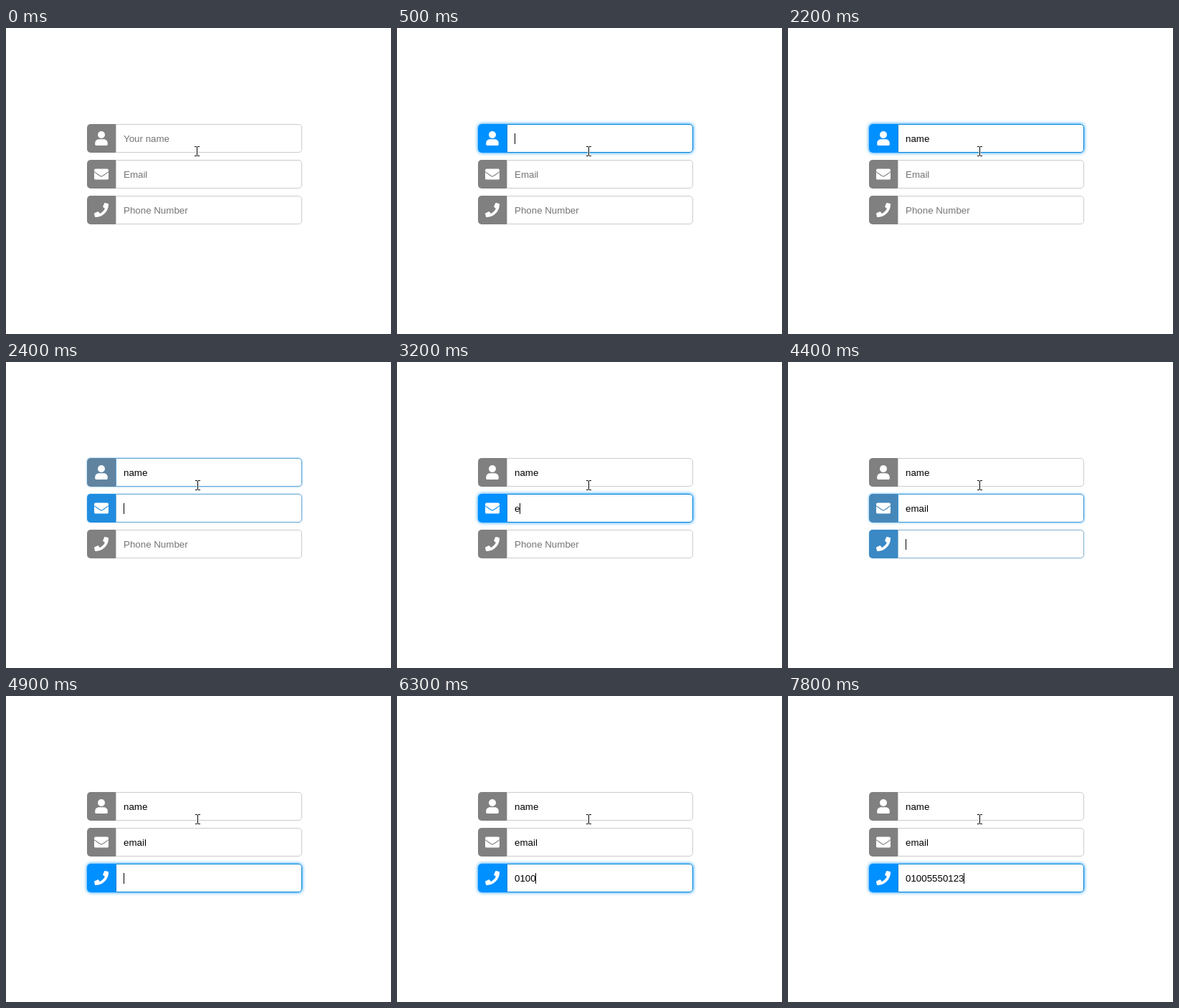
An HTML page for the animation above (8000 ms loop, 537x427 px).

```html
<!DOCTYPE html>
<html lang="en">
<head>
<meta charset="utf-8">
<title>Form focus</title>
<style>
  html, body { margin: 0; width: 100%; height: 100%; overflow: hidden; background: #fff; }
  .field {
    position: absolute; left: 113px; width: 300px; height: 40px; border-radius: 5px;
    font: 13.3333px/15px "Liberation Sans", Arial, sans-serif;
  }
  .icon {
    position: absolute; width: 40px; height: 40px;
    border-radius: 5px 0 0 5px; background: currentColor;
  }
  .icon svg { position: absolute; left: 10px; top: 9.5px; width: 20px; height: 20px; fill: #fff; overflow: visible; }
  .input {
    position: absolute; left: 40px; width: 260px; height: 40px; box-sizing: border-box;
    border: 1px solid; border-radius: 0 5px 5px 0; background: #fff;
  }
  .text { position: absolute; left: 10px; top: 12px; white-space: pre; }
  .caret { position: absolute; top: 12px; width: 1px; height: 15px; background: #000; }
  #pointer { position: absolute; top: 164px; width: 9px; height: 16px; fill: none; }
</style>
</head>
<body>
<svg id="pointer" viewBox="0 0 9 16">
  <path id="beam" d="M1 1.5H4M5 1.5H8M4.5 2V14M1 14.5H4M5 14.5H8" stroke="#fff" stroke-width="2.6"/>
  <path d="M1 1.5H4M5 1.5H8M4.5 2V14M1 14.5H4M5 14.5H8" stroke="#000"/>
</svg>
<script>
const LOOP = 8000, STEP = 100, FADE = 300, CARET_ON = 600;
const GREY = [128, 128, 128], BLUE = [0, 144, 255];
const EDGE = [204, 204, 204], EDGE_ON = [0, 130, 214];

const user = `<circle cx="256" cy="128" r="128"/>
  <path d="M32 464v-42c0-74 60-134 134-134h180c74 0 134 60 134 134v42q0 48-48 48H80q-48 0-48-48z"/>`;
const envelope = `<rect y="64" width="512" height="384" rx="48"/>
  <path d="M0 170L173 294Q256 378 339 294L512 170" fill="none" stroke="currentColor" stroke-width="28"/>`;
const handset = `<path d="M493 25l-104-24c-11-3-23 3-27 14l-48 112c-4 10-1 21 7 28l60 49c-36 77-99 141-177 178
  l-49-61c-7-8-18-11-28-7l-112 48q-18 9-14 27l24 104q5 19 23 19c256 0 464-207 464-464q0-18-19-23z"/>`;

// start: focus time; first, last: key presses; pace: above 1 the typing speeds up
const fields = [
  { icon: user, hint: 'Your name', word: 'name', start: 160, first: 1300, last: 1600, pace: 0.5 },
  { icon: envelope, hint: 'Email', word: 'email', start: 2265, first: 3200, last: 4000, pace: 2 },
  { icon: handset, hint: 'Phone Number', word: '01005550123', start: 4305, first: 5500, last: 7800, pace: 1 }
];

function add(parent, className) {
  const el = document.createElement('div');
  el.className = className;
  return parent.appendChild(el);
}

fields.forEach((f, i) => {
  f.end = i < 2 ? fields[i + 1].start : Infinity;
  f.box = add(document.body, 'field');
  f.box.style.top = 134 + 50 * i + 'px';
  f.badge = add(f.box, 'icon');
  f.badge.innerHTML = `<svg viewBox="0 0 512 512">${f.icon}</svg>`;
  f.input = add(f.box, 'input');
  f.text = add(f.input, 'text');
  f.caret = add(f.input, 'caret');
});
const pointer = document.getElementById('pointer');
document.body.append(pointer);

const clamp = x => Math.min(1, Math.max(0, x));
const mix = (a, b, p) => `rgb(${a.map((v, i) => Math.round(v + (b[i] - v) * p))})`;

// CSS "ease": cubic-bezier(.25, .1, .25, 1)
function ease(x) {
  let lo = 0, hi = 1;
  for (let i = 0; i < 20; i++) {
    const s = (lo + hi) / 2;
    if (0.75 * s * (1 - s) + s ** 3 < x) lo = s; else hi = s;
  }
  const s = hi;
  return 0.3 * s * (1 - s) ** 2 + 3 * s * s * (1 - s) + s ** 3;
}

function typed(f, t) {
  if (t < f.first) return '';
  const u = clamp((t - f.first) / (f.last - f.first));
  return f.word.slice(0, Math.round(1 + (f.word.length - 1) * u ** f.pace));
}

// The caret stays lit for a while after focus and after the last key.
function caretLit(f, t) {
  if (t < f.start || t >= f.end) return false;
  return t < f.start + CARET_ON || (t >= f.first && t < f.last + CARET_ON);
}

function drawField(f, t) {
  const on = clamp((t - f.start) / FADE), off = clamp((t - f.end) / FADE);
  const glow = on - off;
  f.badge.style.color = mix(GREY, BLUE, ease(on) - ease(off));
  f.input.style.borderColor = mix(EDGE, EDGE_ON, glow);
  f.box.style.boxShadow = `0 0 ${5 * glow}px rgba(${BLUE}, ${glow})`;

  const focused = t >= f.start;
  f.text.textContent = focused ? typed(f, t) : f.hint;
  f.text.style.color = focused ? '#000' : '#757575';
  f.caret.hidden = !caretLit(f, t);
  f.caret.style.left = 10 + Math.floor(f.text.getBoundingClientRect().width) + 'px';
}

function draw() {
  const t = Math.floor(performance.now() % LOOP / STEP) * STEP;
  fields.forEach(f => drawField(f, t));
  pointer.style.left = (t < 300 ? 262 : 263) + 'px';
  requestAnimationFrame(draw);
}
draw();
</script>
</body>
</html>
```
